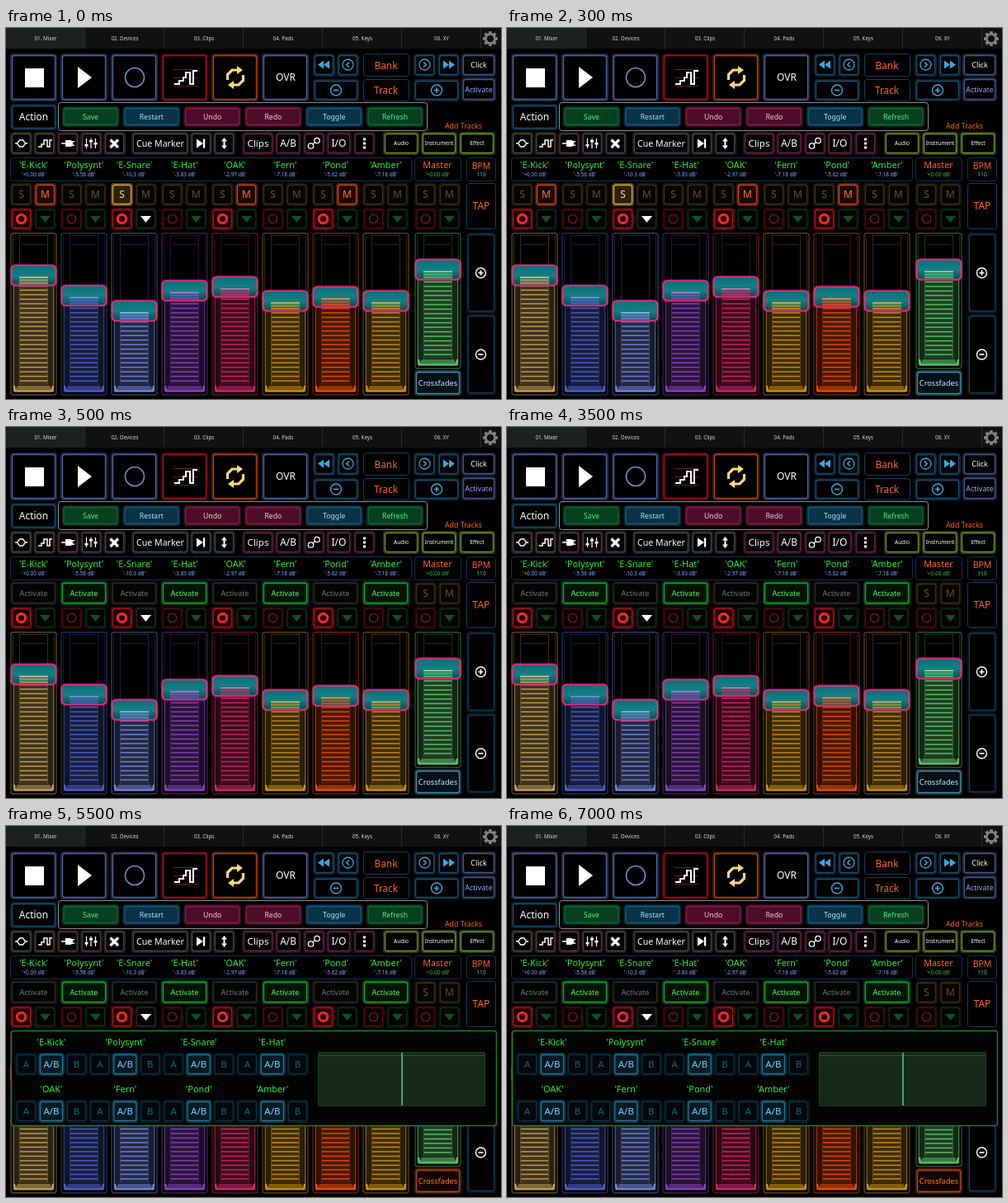
Recreate the animation shown at these times as an HTML page with a canvas. Size 600 by 450 pixels, loop 8000 ms.

```html
<!DOCTYPE html>
<html lang="en">
<head>
<meta charset="utf-8">
<title>Mixer control surface</title>
<style>
html, body { margin: 0; width: 100%; height: 100%; overflow: hidden; background: #000; }
canvas { display: block; }
</style>
</head>
<body>
<canvas id="stage" width="600" height="450"></canvas>
<script>
const ctx = document.getElementById('stage').getContext('2d');
const LOOP = 8000, ACTIVATE_AT = 500, CROSSFADES_AT = 5500;
const PITCH = 61;
const ORANGE = '#ff6414', GREEN = '#22ee33', TEAL = '#145070', LAVENDER = '#4e62a0';

const channels = [
  { name: 'E-Kick',   db: '+0.00', color: '#d2ab5c', knob: 300, mute: true },
  { name: 'Polysynt', db: '-5.58', color: '#5467d4', knob: 324.5 },
  { name: 'E-Snare',  db: '-10.3', color: '#7b8de6', knob: 343 },
  { name: 'E-Hat',    db: '-3.83', color: '#9148c8', knob: 318.5 },
  { name: 'OAK',      db: '-2.97', color: '#d82c6c', knob: 314, mute: true },
  { name: 'Fern',     db: '-7.18', color: '#d89c0c', knob: 331 },
  { name: 'Pond',     db: '-5.62', color: '#f85400', knob: 326, mute: true },
  { name: 'Amber',    db: '-7.18', color: '#d89c14', knob: 331 }
];
channels[2].solo = true;

function text(str, x, y, size, color) {
  ctx.font = `${size}px "Noto Sans", "Open Sans", sans-serif`;
  ctx.textAlign = 'center';
  ctx.fillStyle = color;
  ctx.fillText(str, x, y + size * 0.36);
}

function box(x, y, w, h, color, fill = '#000', radius = 3, line = 1) {
  ctx.beginPath();
  ctx.roundRect(x + 0.5, y + 0.5, w - 1, h - 1, radius);
  ctx.fillStyle = fill;
  ctx.fill();
  ctx.strokeStyle = color;
  ctx.lineWidth = line;
  ctx.stroke();
}

// Neon button: soft outer frame around a crisp inner one.
function button(x, y, w, h, color, fill = '#000') {
  ctx.globalAlpha = 0.42;
  box(x + 0.5, y + 0.5, w - 1, h - 1, color, '#000', 3, 2);
  ctx.globalAlpha = 1;
  box(x + 2, y + 2, w - 4, h - 4, color, fill, 2.5, 1.3);
}

function label(str, x, y, w, h, size, color, border, fill) {
  button(x, y, w, h, border, fill);
  text(str, x + w / 2, y + h / 2, size, color);
}

function shape(d, color) {
  ctx.fillStyle = color;
  ctx.fill(new Path2D(d));
}

function line(d, color, width = 1) {
  ctx.strokeStyle = color;
  ctx.lineWidth = width;
  ctx.stroke(new Path2D(d));
}

function ring(x, y, r, color, width) {
  ctx.beginPath();
  ctx.arc(x, y, r, 0, 7);
  ctx.strokeStyle = color;
  ctx.lineWidth = width;
  ctx.stroke();
}

function signCircle(x, y, r, color, plus) {
  ring(x, y, r, color, 1.4);
  line(`M${x - 3} ${y}h6` + (plus ? `M${x} ${y - 3}v6` : ''), color, 1.7);
}

function tabs() {
  const names = ['Mixer', 'Devices', 'Clips', 'Pads', 'Keys', 'XY'];
  ctx.fillStyle = '#101211';
  ctx.fillRect(0, 0, 600, 25);
  ctx.fillStyle = '#1c211e';
  ctx.fillRect(0, 0, 95, 25);
  names.forEach((name, i) => {
    line(`M${96 * i + 95.5} 0v25`, '#292c2a');
    text(`0${i + 1}. ${name}`, 48 + 96 * i, 13, 6.3, '#d4d8d4');
  });
  for (let i = 0; i < 8; i++) {
    const a = i * Math.PI / 4, c = Math.cos(a), s = Math.sin(a);
    line(`M${587 + 6 * c} ${13 + 6 * s}L${587 + 9 * c} ${13 + 9 * s}`, '#808381', 3.6);
  }
  ring(587, 13, 5.6, '#808381', 2.8);
}

function transport() {
  const borders = [LAVENDER, LAVENDER, LAVENDER, '#a81020', '#b04410', LAVENDER];
  borders.forEach((color, i) => button(5 + PITCH * i, 31, 57, 58, color));
  shape('M23 49h23v23h-23z', '#fff');
  shape('M87 47L104 60L87 73z', '#fff');
  ring(156, 60, 11.5, '#6c90cc', 1.6);
  line('M203 50.5h29M203 60.5h29M203 70.5h29', '#6c1c24');
  line('M204 68h6v-4h5v-4h3v-6h5v14h4v-16h5', '#fff', 2);
  line('M268.5 63V56.5L274 51H282M287.5 57V63.5L282 69H274', '#ffd878', 3.2);
  shape('M280 46L287 51L280 56zM276 64L269 69L276 74z', '#ffd878');
  text('OVR', 339, 60, 12, '#fff');
}

function navigation() {
  const icon = '#38a9dc';
  for (const x of [372, 401, 494, 523]) button(x, 31, 27, 28, TEAL);
  shape('M385 39.5v10L378 44.5zM392 39.5v10L385 44.5z', icon);
  shape('M530 39.5v10L537 44.5zM537 39.5v10L544 44.5z', icon);
  ring(414.5, 44.5, 6.5, icon, 1.3);
  line('M416 41.5L412.7 44.5L416 47.5', icon, 1.5);
  ring(507.5, 44.5, 6.5, icon, 1.3);
  line('M506 41.5L509.3 44.5L506 47.5', icon, 1.5);
  button(372, 62, 56, 27, TEAL);
  button(494, 62, 56, 27, TEAL);
  signCircle(400, 75.5, 6.5, icon, false);
  signCircle(522, 75.5, 6.5, icon, true);
  box(433, 31, 56, 28, '#124058');
  box(433, 62, 56, 27, '#124058');
  text('Bank', 460.5, 45.5, 11.8, ORANGE);
  text('Track', 460.5, 76, 11.8, ORANGE);
  label('Click', 552, 31, 42, 28, 9, '#fff', '#465488');
  label('Activate', 552, 60, 42, 29, 9, '#94a8ff', '#465488');
}

function actions() {
  label('Action', 5, 92, 57, 32, 12, '#fff', TEAL);
  box(63, 90, 448, 35, '#8d9192');
  const green = ['#074020', '#0a6c38', '#3ef58c'];
  const blue = ['#0a3347', '#155c80', '#a4e4ff'];
  const pink = ['#4d0d2a', '#842046', '#ffc2d4'];
  const items = [['Save', green], ['Restart', blue], ['Undo', pink],
                 ['Redo', pink], ['Toggle', blue], ['Refresh', green]];
  items.forEach(([name, [fill, border, color]], i) =>
    label(name, 67.5 + 73.8 * i, 95, 70, 25, 8.7, color, border, fill));
  text('Add Tracks', 554.5, 119, 8.9, ORANGE);
}

function toolbar() {
  const grey = '#484543', plum = '#642444', white = '#fff';
  const toolColors = ['#454c38', '#524530', '#563838', '#503a4a', grey];
  toolColors.forEach((color, i) => button(5 + 28.3 * i, 126, 27, 28, color));
  line('M11 140h2.5l3-4h4l3 4h2.5M13.5 140l3 4h4l3-4', white, 1.3);
  line('M39 144h4v-3h3v-5h4v8h3v-8h3', white, 1.5);
  shape('M72 136h5a4 4 0 0 1 0 8h-5zM67 139.2h5v1.6h-5zM80 137h3v1.5h-3zM80 141.5h3v1.5h-3z', white);
  line('M97.5 134v12M103 134v12M108.5 134v12', white, 1.2);
  shape('M95.5 141h4v2.5h-4zM101 136h4v2.5h-4zM106.5 139h4v2.5h-4z', white);
  line('M126.5 135.5L136 145M136 135.5L126.5 145', white, 3.2);
  label('Cue Marker', 152, 126, 70, 28, 10.6, white, grey);
  button(223, 126, 27, 28, grey);
  shape('M231 134.5L239 140L231 145.5zM239 134.5h2.2v11h-2.2z', white);
  button(251, 126, 27, 28, grey);
  shape('M264.5 133l3.5 4.5h-2.5v5h2.5l-3.5 4.5l-3.5-4.5h2.5v-5h-2.5z', white);
  label('Clips', 286, 126, 39, 28, 11.5, white, plum);
  label('A/B', 326, 126, 32, 28, 11.8, white, plum);
  button(360, 126, 27, 28, plum);
  ring(369.5, 143, 3.2, white, 1.3);
  ring(377, 136.5, 3.2, white, 1.3);
  line('M371.5 141L375 138.5', white, 1.3);
  label('I/O', 388, 126, 31, 28, 12, white, plum);
  button(421, 126, 27, 28, plum);
  shape('M433 133.5h3v3h-3zM433 138.5h3v3h-3zM433 143.5h3v3h-3z', white);
  label('Audio', 457, 126, 44, 28, 6.5, white, '#7e821e');
  label('Instrument', 503, 126, 44, 28, 6.5, white, '#789220');
  label('Effect', 549, 126, 44, 28, 6.5, white, '#6c9424');
}

function headings() {
  const border = '#10324c';
  box(5, 157, 487, 29, border);
  box(495, 157, 57, 29, border);
  box(558, 157, 36, 29, border);
  channels.forEach(({ name, db }, i) => {
    const x = 33.5 + PITCH * i;
    text(`'${name}'`, x, 166, 10.9, GREEN);
    text(`'${db} dB'`, x, 177.5, 6.4, '#88a8ff');
  });
  text('Master', 523, 166, 10.8, ORANGE);
  text("'+0.00 dB'", 523, 177.5, 6.4, '#35c43d');
  text('BPM', 576, 167, 10.4, ORANGE);
  text('110', 576, 177.5, 6.6, '#5cc8a8');
  box(558, 188, 36, 56, '#124058');
  text('TAP', 576, 216, 12, ORANGE);
}

function soloMute(x, solo, mute) {
  label('S', x, 188, 27, 28, 12, solo ? '#ffeb9c' : '#655a24',
    solo ? '#dca818' : '#3a330f', solo ? '#2c2204' : '#050502');
  label('M', x + 29, 188, 27, 28, 12, mute ? '#ff7828' : '#655324',
    mute ? '#d04408' : '#382e10', mute ? '#1c0802' : '#050502');
}

function recordRow(x, armed, open) {
  button(x, 218, 27, 27, armed ? '#b80c18' : '#500b12', armed ? '#140203' : '#050001');
  ring(x + 13.5, 231.5, 5.2, armed ? '#ff2424' : '#7a1820', armed ? 3.2 : 1.3);
  button(x + 29, 218, 27, 27, open ? '#222824' : '#0e2c18', '#020402');
  shape(`M${x + 36} 228h13l-6.5 8z`, open ? '#fff' : '#0e5020');
}

function channelButtons(activateMode) {
  channels.forEach(({ solo, mute }, i) => {
    const x = 5 + PITCH * i, on = i % 2 === 1;
    if (activateMode) {
      label('Activate', x, 187, 57, 29, 9.1, on ? '#48ff58' : '#77776c',
        on ? '#10a822' : '#2c2c25', on ? '#031406' : '#040404');
    } else {
      soloMute(x, solo, mute);
    }
    recordRow(x, !on, i === 2);
  });
  soloMute(495, false, false);
  recordRow(495, false, false);
}

function fader(x, bottom, color, knob) {
  const top = 248, height = bottom - knob - 5;
  ctx.globalAlpha = 0.42;
  box(x + 0.5, top + 0.5, 56, bottom - top - 1, color, '#000', 3, 1.3);
  ctx.globalAlpha = 0.25;
  line(`M${x + 3.5} ${top + 4}V${bottom - 4}M${x + 53.5} ${top + 4}V${bottom - 4}
    M${x + 11.5} ${top + 3}V${bottom - 13}M${x + 45.5} ${top + 3}V${bottom - 13}
    M${x + 11} ${top + 3.5}h35M${x + 14} ${top + 14.5}h29`, color);

  // The lit part below the knob.
  ctx.fillStyle = color;
  ctx.globalAlpha = 0.2;
  ctx.fillRect(x + 4, knob, 49, height);
  ctx.globalAlpha = 0.12;
  ctx.fillRect(x + 11, knob, 35, height - 8);
  ctx.globalAlpha = 0.5;
  line(`M${x + 4.5} ${knob}V${bottom - 5}M${x + 52.5} ${knob}V${bottom - 5}`, color);
  ctx.globalAlpha = 0.85;
  for (let y = bottom - 18; y > knob + 12; y -= 5.5) line(`M${x + 12} ${y}h33`, color, 1.3);

  // Tray at the foot of the track.
  ctx.globalAlpha = 0.5;
  shape(`M${x + 5} ${bottom - 5}L${x + 9} ${bottom - 12}h39l4 7z`, color);
  ctx.globalAlpha = 1;
  line(`M${x + 5} ${bottom - 12}l1 6.5h45l1 -6.5`, color, 2);
  faderKnob(x + 1, knob, color);
}

function faderKnob(x, y, color) {
  const fill = ctx.createLinearGradient(0, y - 12, 0, y + 12);
  fill.addColorStop(0, '#087078');
  fill.addColorStop(0.5, '#167f83');
  fill.addColorStop(1, '#0a4b50');
  ctx.globalAlpha = 0.35;
  box(x - 1, y - 13.5, 57, 27, '#ff2c88', '#000', 6, 2);
  ctx.globalAlpha = 1;
  box(x, y - 12.5, 55, 25, '#f42b82', fill, 5, 1.7);
  ctx.globalAlpha = 0.35;
  shape(`M${x + 10} ${y + 1}h35v10h-35z`, color);
  ctx.globalAlpha = 0.85;
  line(`M${x + 10} ${y + 2.5}h35M${x + 10} ${y + 6}h35M${x + 10} ${y + 9.5}h35`, color, 1.1);
  ctx.globalAlpha = 0.5;
  line(`M${x + 10} ${y + 2.5}h35`, '#e8fff0');
  ctx.globalAlpha = 1;
}

function faders(crossfadesOpen) {
  channels.forEach(({ color, knob }, i) => fader(5 + PITCH * i, 446, color, knob));
  fader(495, 414, '#62d070', 293);
  button(558, 248, 36, 98, '#103a52');
  button(558, 347, 36, 98, '#103a52');
  signCircle(575.5, 297, 6, '#fff', true);
  signCircle(575.5, 396, 6, '#fff', false);
  if (crossfadesOpen) {
    label('Crossfades', 495, 415, 57, 31, 9.2, '#ff7a2c', '#b04410', '#140602');
  } else {
    label('Crossfades', 495, 415, 57, 31, 9.2, '#c4ecff', '#4488a4', '#041018');
  }
}

function crossfadePanel() {
  box(6, 248, 589, 116, '#178030', '#020402', 3, 1.4);
  channels.forEach(({ name }, i) => {
    const x = 55 + 89.3 * (i % 4), y = i < 4 ? 275 : 332;
    text(`'${name}'`, x, y - 13, 10.9, GREEN);
    label('A', x - 44, y, 27, 28, 11.5, '#1c6180', '#0e3042', '#02080b');
    label('A/B', x - 16, y, 32, 28, 11.5, '#6bd2ff', '#207498', '#051a25');
    label('B', x + 17, y, 27, 28, 11.5, '#1c6180', '#0e3042', '#02080b');
  });
  box(378, 274, 203, 66, '#1c3a22', '#152a19', 0);
  line('M379 278.5h201', '#2b5633');
  line('M480 275v64', '#5fc078', 1.6);
}

function draw(phase) {
  ctx.fillStyle = '#000';
  ctx.fillRect(0, 0, 600, 450);
  tabs();
  transport();
  navigation();
  actions();
  toolbar();
  headings();
  channelButtons(phase > 0);
  faders(phase === 2);
  if (phase === 2) crossfadePanel();
}

const start = performance.now();
let shown = -1;

function tick() {
  const t = (performance.now() - start) % LOOP;
  const phase = t < ACTIVATE_AT ? 0 : t < CROSSFADES_AT ? 1 : 2;
  if (phase !== shown) draw(shown = phase);
  requestAnimationFrame(tick);
}
tick();
</script>
</body>
</html>
```
